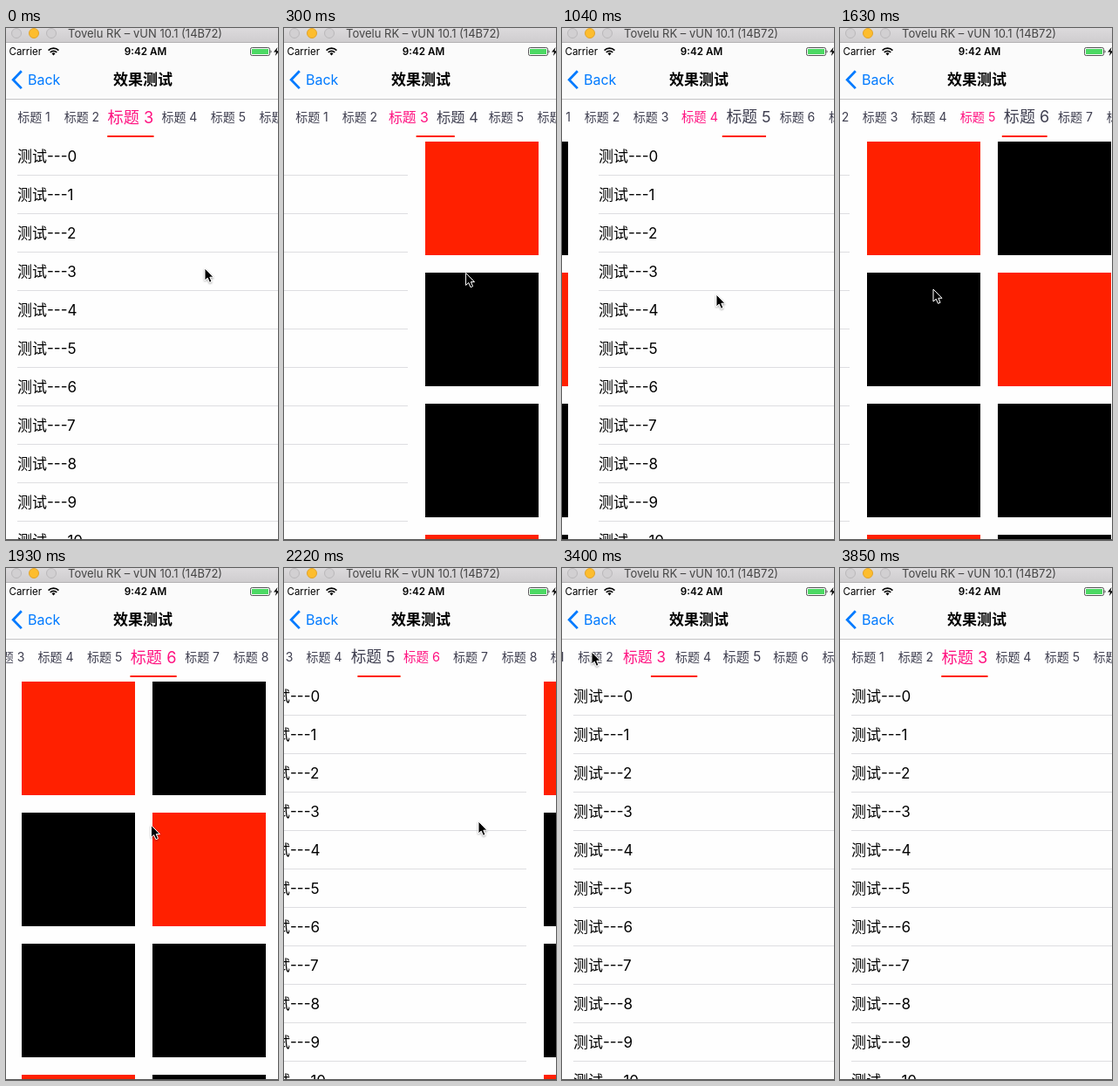
An HTML page for the animation above (4100 ms loop, 312 by 586 pixels).

```html
<!DOCTYPE html>
<html lang="zh-CN">
<head>
<meta charset="utf-8">
<title>效果测试</title>
<style>
  html, body { margin: 0; width: 100%; height: 100%; overflow: hidden; background: #fefefe; }
  svg { display: block; }
  text { font-family: Inter, "Noto Sans CJK SC", "Noto Sans CJK JP", sans-serif; white-space: pre; }
  .tab { font-size: 14px; text-anchor: middle; }
  .row { font-size: 17px; }
</style>
</head>
<body>
<svg width="312" height="586" viewBox="0 0 312 586">
  <defs>
    <linearGradient id="chrome" x2="0" y2="1">
      <stop stop-color="#dcdadc"/><stop offset="1" stop-color="#cfcdcf"/>
    </linearGradient>
    <filter id="shadow" x="-50%" y="-50%" width="200%" height="200%">
      <feDropShadow dx="0" dy="1" stdDeviation="1" flood-opacity="0.4"/>
    </filter>
  </defs>
  <rect width="312" height="586" fill="#fefefe"/>
  <g id="pages"></g>
  <rect y="81" width="312" height="44" fill="#fefefe"/>
  <g id="tabs"></g>
  <rect id="line" y="123" height="2" fill="#ff2000"/>

  <rect width="312" height="81" fill="#fbfbfb"/>
  <rect y="81" width="312" height="1" fill="#c4c4c6"/>
  <rect width="312" height="16" fill="url(#chrome)"/>
  <rect y="16" width="312" height="1" fill="#b4b2b4"/>
  <circle cx="12" cy="6" r="5.5" fill="#d2d0d2" stroke="#bab8ba"/>
  <circle cx="32" cy="6" r="5.5" fill="#fdbd2e" stroke="#e2a32a"/>
  <circle cx="52" cy="6" r="5.5" fill="#d2d0d2" stroke="#bab8ba"/>
  <text x="71" y="11" font-size="13" fill="#444">Tovelu RK – vUN 10.1 (14B72)</text>

  <text x="3.5" y="31.2" font-size="11.5">Carrier</text>
  <path d="M48.6 25.6a8.4 8.4 0 0 1 11.8 0M50.8 27.9a5.2 5.2 0 0 1 7.4 0"
        fill="none" stroke="#000" stroke-width="1.7"/>
  <path d="M54.5 31.5l-2-2.2a2.9 2.9 0 0 1 4 0z"/>
  <text x="160" y="31.2" font-size="11.7" font-weight="600" text-anchor="middle">9:42 AM</text>
  <rect x="280.5" y="22.5" width="22" height="9" rx="1.8" fill="none" stroke="#555"/>
  <rect x="282" y="24" width="19" height="6" fill="#4cd964"/>
  <path d="M303.5 25.2a2 2 0 0 1 0 3.6z" fill="#555"/>
  <path d="M311.5 22l-4.5 5.6h3l-1.2 4.4 4.6-5.8h-3z"/>

  <path d="M17.8 49.3L8.2 59.2l9.6 9.9" fill="none" stroke="#007aff" stroke-width="2.8"/>
  <text x="25" y="65" font-size="16" fill="#007aff">Back</text>
  <text x="157" y="65.2" font-size="17" font-weight="600" text-anchor="middle">效果测试</text>

  <rect y="585" width="312" height="1" fill="#555"/>
  <path id="cursor" d="M0 0V14L3.2 11.1 5.5 16.3 8 15.2 5.8 10.2H10Z" stroke="#fff" filter="url(#shadow)"/>
</svg>
<script>
const LOOP = 4100, STEP = 148.15, LAST = 26;
const PAGE = 320, LEFT = -2, LABEL = 41, GROW = 0.3;
const INK = '#3f3f50', PINK = '#ff1280', RED = '#ff2000';
const SWIPE = 425, SLIDE = 300;

// Four swipes between neighbouring pages, then a tap that jumps two tabs back.
const swipe = (start, from, to) => ({ start, from, to, settled: start + SWIPE });
const moves = [
  swipe(160, 3, 4),
  swipe(743.2, 4, 5),
  swipe(1290.6, 5, 6),
  swipe(1945.3, 6, 5),
  { start: 3070, from: 5, to: 3, settled: 3110, tap: true }
];

// Time, x, y of the pointer's main stops.
const stops = [[0, 228, 275], [740, 174, 290], [1040, 177, 305], [1630, 107, 299],
  [2220, 223, 290], [3000, 34, 96], [3400, 34, 96], [3850, 5, 590]];

const $ = id => document.getElementById(id);
const mix = (a, b, k) => a + (b - a) * k;
const unit = v => Math.min(1, Math.max(0, v));
const easeOut = u => 1 - (1 - u) ** 2;
const easeInOut = u => u * u * (3 - 2 * u);

const tabX = n => n < 2 ? 32 : 86.9 + 56 * (n - 2);
const scrollFor = n => Math.max(0, tabX(n) - 158);

function add(parent, tag, attrs, text = '') {
  const el = document.createElementNS('http://www.w3.org/2000/svg', tag);
  set(el, attrs);
  el.textContent = text;
  return parent.appendChild(el);
}

function set(el, attrs) {
  for (const key in attrs) el.setAttribute(key, attrs[key]);
}

function list(g) {
  for (let i = 0; i < 11; i++) {
    const y = 125 + 44 * i;
    add(g, 'text', { class: 'row', x: 15, y: y + 28 }, '测试---' + i);
    add(g, 'rect', { x: 15, y: y + 43, width: PAGE - 15, height: 1, fill: '#dedee1' });
  }
}

function grid(g) {
  for (let i = 0; i < 8; i++) {
    add(g, 'rect', {
      x: 20 + 150 * (i % 2), y: 130 + 150 * (i >> 1),
      width: 130, height: 130, fill: i % 3 ? '#000' : RED
    });
  }
}

const pages = [3, 4, 5, 6].map(n => {
  const el = add($('pages'), 'g', {});
  (n % 2 ? list : grid)(el);
  return { n, el };
});
const tabs = Array.from({ length: 10 }, (_, i) => (
  { n: i + 1, el: add($('tabs'), 'text', { class: 'tab', y: 5 }, '标题 ' + (i + 1)) }
));

function pointer(t) {
  const i = Math.max(1, stops.findIndex(s => s[0] > t));
  const [t0, x0, y0] = stops[i - 1], [t1, x1, y1] = stops[i];
  const k = easeInOut(unit((t - t0) / (t1 - t0)));
  return `translate(${mix(x0, x1, k)} ${mix(y0, y1, k)})`;
}

function draw(t) {
  const { start, from, to, tap } = moves.filter(m => m.start <= t).pop() || moves[0];
  const k = tap ? easeInOut(unit((t - start) / SLIDE)) : easeOut(unit((t - start) / SWIPE));
  const page = !tap ? mix(from, to, k) : to;

  // Once a page has settled, its tab turns pink and the tab bar slides to it.
  let selected = moves[0].from, scroll = 0;
  for (const m of moves.filter(m => m.settled <= t)) {
    selected = m.to;
    scroll = mix(scroll, scrollFor(m.to), easeInOut(unit((t - m.settled) / SLIDE)));
  }

  for (const { n, el } of pages)
    set(el, { transform: `translate(${Math.round(LEFT + PAGE * (n - page))})` });

  for (const { n, el } of tabs) {
    const size = n === to ? k : n === from ? 1 - k : 0;
    set(el, {
      transform: `translate(${tabX(n) - scroll} 102) scale(${1 + GROW * size})`,
      fill: n === selected ? PINK : INK
    });
  }

  const width = LABEL * (1 + GROW * (tap ? 1 : 1 - 3 * k * (1 - k)));
  set($('line'), { x: mix(tabX(from), tabX(to), k) - scroll - width / 2, width });

  set($('cursor'), { transform: pointer(t), visibility: t < 3850 ? 'visible' : 'hidden' });
}

// The screen is refreshed at a fixed low rate, so time advances in steps.
const begin = performance.now();
function tick() {
  const t = (performance.now() - begin) % LOOP;
  const i = Math.min(LAST, Math.floor((t + 4) / STEP));
  draw(Math.round(i * STEP / 10) * 10);
  requestAnimationFrame(tick);
}
tick();
</script>
</body>
</html>
```
